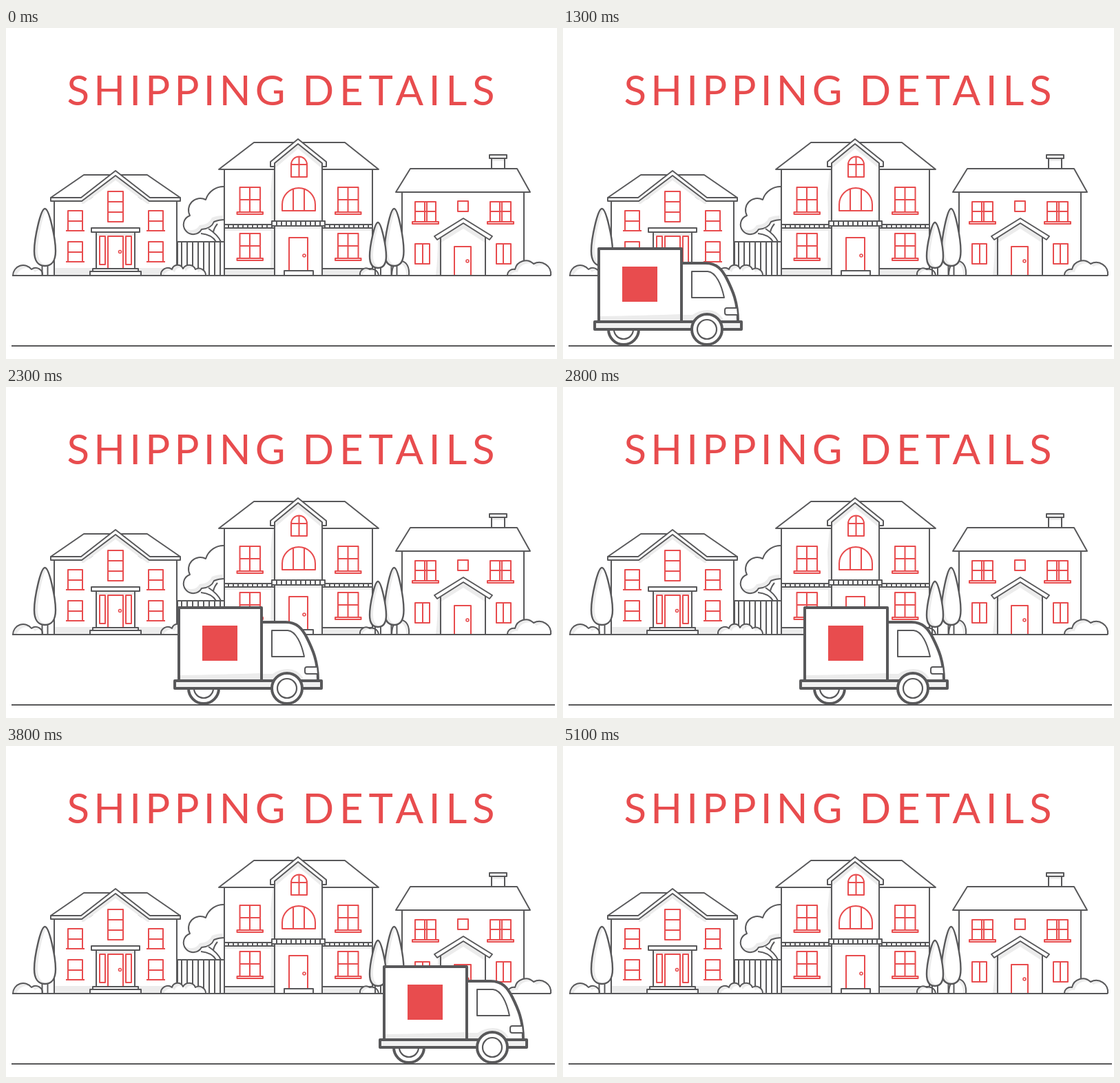
Animation, 800 px wide and 480 px high, one loop 5.2 s. Source, as an HTML page with a canvas:

```html
<!DOCTYPE html>
<html lang="en">
<head>
<meta charset="utf-8">
<title>Shipping details</title>
<style>
html, body { margin: 0; width: 100%; height: 100%; overflow: hidden; background: #fff; }
canvas { display: block; width: 800px; height: 480px; }
</style>
</head>
<body>
<canvas id="stage" width="800" height="480"></canvas>
<script>
const ctx = document.getElementById('stage').getContext('2d');
const RED = '#e84c4e', DARK = '#58585a', SHADE = '#ececec', WHITE = '#fff';
const LOOP = 5200, STEP = 100, SPEED = 0.1988, GROUND = 359;

function shape(d, fill, stroke = DARK, width = 2) {
  const path = new Path2D(d);
  if (fill) { ctx.fillStyle = fill; ctx.fill(path); }
  if (stroke) { ctx.strokeStyle = stroke; ctx.lineWidth = width; ctx.stroke(path); }
}
const line = (d, color = DARK, width = 2) => shape(d, null, color, width);
const tint = (d, color = SHADE) => shape(d, color, null);
const box = (x1, y1, x2, y2) => `M${x1},${y1}H${x2}V${y2}H${x1}Z`;

function circle(x, y, r, fill, stroke = DARK, width = 2) {
  shape(`M${x - r},${y}a${r},${r} 0 1 1 ${2 * r},0a${r},${r} 0 1 1 ${-2 * r},0Z`, fill, stroke, width);
}

// White form with a grey rim left where the lit part is shifted away.
function shaded(d, dx, dy, width = 2) {
  tint(d);
  ctx.save();
  ctx.clip(new Path2D(d));
  ctx.translate(dx, dy);
  tint(d, WHITE);
  ctx.restore();
  line(d, DARK, width);
}

function cypress(x, top, w, bottom) {
  const h = bottom - top;
  line(`M${x - 4},${bottom - 3}V${GROUND}M${x + 4},${bottom - 3}V${GROUND}`);
  shaded(`M${x},${top}C${x + w * .4},${top} ${x + w},${top + h * .52} ${x + w},${top + h * .74}
    C${x + w},${top + h * .92} ${x + w * .6},${bottom} ${x},${bottom}
    C${x - w * .6},${bottom} ${x - w},${top + h * .92} ${x - w},${top + h * .74}
    C${x - w},${top + h * .52} ${x - w * .4},${top} ${x},${top}Z`, 5, -1, 2.4);
}

// Window with bars at the given x and y positions; sill is its overhang.
function pane(x1, y1, x2, y2, xs = [], ys = [], sill = 0, sillHeight = 0) {
  shape(box(x1, y1, x2, y2), WHITE, RED);
  xs.forEach(x => line(`M${x},${y1}V${y2}`, RED));
  ys.forEach(y => line(`M${x1},${y}H${x2}`, RED));
  if (sill) shape(box(x1 - sill, y2, x2 + sill, y2 + sillHeight), WHITE, RED);
}

function ticks(x1, x2, y1, y2, gap) {
  for (let x = x1; x < x2; x += gap) line(`M${x},${y1}V${y2}`);
}

function title() {
  ctx.fillStyle = RED;
  ctx.font = '400 60px Lato, sans-serif';
  ctx.letterSpacing = '6.2px';
  ctx.fillText('SHIPPING', 88.5, 112);
  ctx.letterSpacing = '7.8px';
  ctx.fillText('DETAILS', 430.5, 112);
}

function backGarden() {
  line('M283,298C293,299 301,303 305,310M294,291C303,297 309,303 312,310M307,284Q302,290 301,296');
  shaded(`M318,230A27,27 0 0 0 290,249A17,17 0 0 0 267,272A14,14 0 1 0 284,292
    Q298,291 302,281Q309,278 318,278`, -3, -6);
  shape(box(249, 310, 317, GROUND), WHITE);
  ticks(255, 317, 310, GROUND, 8);
}

function leftHouse() {
  shape(box(70, 248, 248, GROUND), WHITE);
  tint(box(71, 348, 247, 358));
  shape('M65,246L113,213H205L253,246Z', WHITE);
  tint('M110,251L159,214L208,251V255H205L159,221L113,255H110Z');
  tint('M113,255L159,221L205,255Z', WHITE);
  shape('M65,246H109L159,207L209,246H253V251H208L159,214L110,251H65Z', WHITE);
  pane(148, 237, 170, 281, [], [252, 267]);
  for (const x of [90, 207]) {
    for (const y of [265, 310]) {
      pane(x, y, x + 21, y + 29, [], [y + 15]);
      line(`M${x - 3},${y + 29}h27`, RED);
    }
  }
  shape(box(131, 296, 187, 349), WHITE);
  tint(box(132, 297, 186, 301));
  shape(box(124, 290, 194, 296), WHITE);
  pane(136, 302, 144, 343);
  pane(174, 302, 182, 343);
  shape('M148,349V302H170V349', WHITE, RED);
  circle(165.5, 324.5, 2, null, RED, 1.6);
  shape(box(126, 349, 192, 353), WHITE);
  shape(box(122, 353, 196, GROUND), WHITE);
}

function middleHouse() {
  shape(box(317, 205, 532, GROUND), WHITE);
  tint(box(318, 349, 531, 358));
  tint('M387,206H390V349H384Q386,285 384,240Z');
  tint(box(318, 291, 531, 294));
  line('M317,349H390M459,349H532');
  shape('M309,205L360,166H492L541,205Z', WHITE);
  shape(box(317, 285, 532, 290), WHITE);
  ticks(323, 532, 285, 290, 7);
  tint('M390,196L424,168L459,196V358H390Z', WHITE);
  tint('M391,196L424,168L458,196V203L424,175L391,203Z');
  line('M390,196V359M459,196V359');
  shape('M384,194L424,161L465,194V201L459,201V196L424,168L390,196V201H384Z', WHITE);
  shape('M414,216V198a11.5,11.5 0 0 1 23,0V216Z', WHITE, RED);
  line('M414,198H437M425.5,187V216', RED);
  shape('M401,265V256a24,24 0 0 1 48,0V265Z', WHITE, RED);
  line('M417,265V234M433,265V234', RED);
  for (const x of [339.5, 482]) {
    for (const y of [231, 298]) pane(x, y, x + 29.5, y + 36, [x + 14.5], [y + 18], 4, 3);
  }
  tint(box(391, 287, 458, 291));
  shape(box(386, 280, 463, 287), WHITE);
  ticks(393, 463, 280, 287, 7);
  shape('M411,352V304H438V352', WHITE, RED);
  circle(433, 330, 2, null, RED, 1.6);
  shape(box(404, 352, 446, GROUND), WHITE);
}

function rightHouse() {
  shape(box(705, 189, 724, 204), WHITE);
  tint(box(706, 190, 723, 193));
  shape(box(702, 184, 727, 189), WHITE);
  shape(box(575, 238, 752, GROUND), WHITE);
  shape('M566,238L587,204H742L761,238Z', WHITE);
  for (const x of [594, 703]) {
    pane(x, 252, x + 30, 281, [x + 14, x + 17], [266], 4, 3);
  }
  pane(656, 251, 671, 266);
  pane(594, 313, 615, 342, [605]);
  pane(712, 313, 733, 342, [722]);
  tint('M627,306H631V358H624Q627,335 627,306Z');
  tint('M631,303L664,283L696,303V358H631Z', WHITE);
  tint('M632,303L664,283L695,303V311L664,291L632,311Z');
  line('M631,303V359M696,303V359');
  shape('M622,302L664,276L706,302L702,307L664,283L626,307Z', WHITE);
  shape('M651,359V317H675V359', WHITE, RED);
  circle(670, 338, 2, null, RED, 1.6);
}

function street() {
  backGarden();
  shaded('M10,359A15,15 0 0 1 37,350A10,10 0 0 1 53,359', 5, 4);
  leftHouse();
  cypress(56.5, 262, 15.5, 345);
  middleHouse();
  shaded(`M225,359A10,10 0 0 1 241,350A8.5,8.5 0 0 1 257,349
    A10,10 0 0 1 275,350A10,10 0 0 1 290,359`, 4, 4);
  rightHouse();
  shaded('M514,359A9,9 0 0 1 528,350A10,10 0 0 1 541,359', 4, 3);
  shaded('M560,359C560,345 566,337 574,338C582,339 586,347 585,359', -4, 3);
  cypress(563.5, 262, 14, 345);
  cypress(540, 282, 12, 348);
  shaded('M728,359A9,9 0 0 1 739,350A16,16 0 0 1 766,342A17,17 0 0 1 791,359', 4, 4);
  line('M9,359H791');
  line('M8,461H797');
}

function wheel(x) {
  circle(x, 437, 22, WHITE, DARK, 4);
  circle(x, 437, 14, WHITE, DARK, 2.2);
}

function truck(dx) {
  ctx.save();
  ctx.beginPath();
  ctx.rect(3, 0, 794, 480);
  ctx.clip();
  ctx.translate(dx, 0);
  wheel(168);
  shape('M252,341H287C303,341 311,350 318,364C326,380 334,397 334,426H252Z', WHITE, DARK, 4);
  tint('M254,416H268Q278,409 290,409Q304,409 312,421V424H254Z');
  shape('M267,353H290C302,354 310,372 314,391H267Z', WHITE, DARK, 2);
  shape('M332,406H318Q315,406 315,409V413Q315,416 318,416H333', WHITE, DARK, 2);
  shape(box(132, 320, 252, 426), WHITE, DARK, 4);
  tint('M134,418Q200,417 250,415V424H134Z');
  tint(box(166, 346, 217, 397), RED);
  shape(box(126, 426, 339, 437), '#f1f1f1', DARK, 4);
  wheel(289);
  ctx.restore();
}

function paint(elapsed) {
  const time = Math.floor((elapsed % LOOP) / STEP) * STEP;
  ctx.fillStyle = WHITE;
  ctx.fillRect(0, 0, 800, 480);
  title();
  street();
  truck(Math.round((time - 1700) * SPEED));
}

ctx.lineJoin = 'round';
let start;
requestAnimationFrame(function tick(now) {
  start ??= now;
  paint(now - start);
  requestAnimationFrame(tick);
});
</script>
</body>
</html>
```
